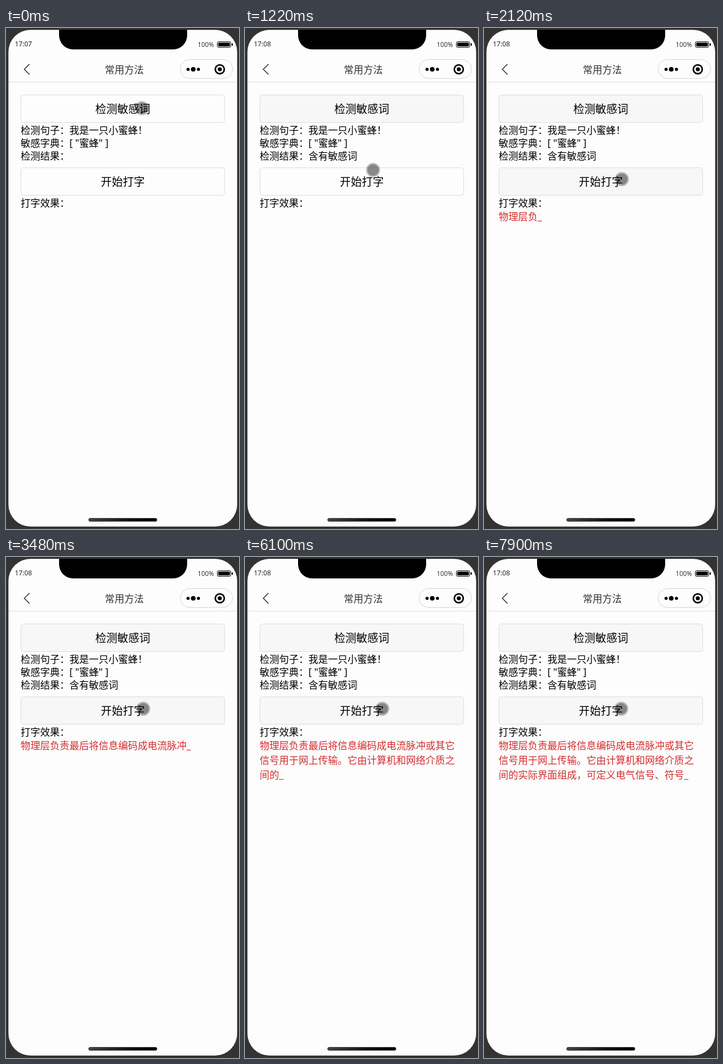
An HTML page with a canvas for the animation above (7990 ms loop, 382 by 819 pixels).

```html
<!DOCTYPE html>
<html lang="zh-CN">
<head>
<meta charset="utf-8">
<title>常用方法</title>
<style>
html, body { margin: 0; width: 100%; height: 100%; overflow: hidden; background: #333; }
canvas { display: block; width: 382px; height: 819px; }
</style>
</head>
<body>
<canvas id="stage"></canvas>
<script>
const W = 382, H = 819, LOOP = 7990;
const FONT = '"Noto Sans", "Noto Sans CJK SC", "Noto Sans CJK", sans-serif';
const PAGE = '#fdfdfd';
// full-width punctuation
const COLON = '\uff1a', COMMA = '\uff0c', BANG = '\uff01';
const TYPED = '物理层负责最后将信息编码成电流脉冲或其它信号用于网上传输。' +
  '它由计算机和网络介质之间的实际界面组成' + COMMA + '可定义电气信号、符号';
const PER_LINE = 20, TYPE_START = 1790, TYPE_STEP = 105;
const DETECT_AT = 590, RESULT_AT = 680, MINUTE_AT = 800, TYPE_CLICK = 1690;

// pointer path: time, x, y
const PATH = [
  [0, 223, 131], [760, 223, 131], [1220, 210, 232], [1310, 210, 238],
  [1400, 212, 240], [1600, 226, 247], [3060, 226, 247], [3120, 225, 248]
];

const canvas = document.getElementById('stage');
const ctx = canvas.getContext('2d');
const dpr = window.devicePixelRatio || 1;
canvas.width = W * dpr;
canvas.height = H * dpr;

function text(str, x, y, size, color = '#000', align = 'left') {
  ctx.font = size + 'px ' + FONT;
  ctx.textAlign = align;
  ctx.fillStyle = color;
  ctx.fillText(str, x, y);
}

function box(x, y, w, h, r, fill, stroke, line = 1) {
  ctx.beginPath();
  ctx.roundRect(x, y, w, h, r);
  if (fill) { ctx.fillStyle = fill; ctx.fill(); }
  if (stroke) { ctx.strokeStyle = stroke; ctx.lineWidth = line; ctx.stroke(); }
}

function disc(x, y, r, color) {
  ctx.beginPath();
  ctx.arc(x, y, r, 0, 7);
  ctx.fillStyle = color;
  ctx.fill();
}

function button(label, y, pressed) {
  box(24.5, y + 0.5, 334, 45, 4, pressed ? '#f7f7f7' : PAGE, '#dedede');
  text(label, 191.5, y + 30, 18, '#000', 'center');
}

function drawPhone(t) {
  ctx.fillStyle = '#333';
  ctx.fillRect(0, 0, W, H);
  box(4, 3, 375, 812, 36, PAGE);
  box(87, 3, 210, 32, [0, 0, 23, 23], '#000');

  text(t < MINUTE_AT ? '17:07' : '17:08', 14.5, 30, 11, '#222');
  text('100%', 341, 31, 10.5, '#333', 'right');
  box(346.5, 22.5, 22, 9, 2, null, '#000');
  box(348, 24, 19, 6, 1, '#000');
  box(370, 25, 2, 4, 1, '#000');

  const bar = ctx.createLinearGradient(135, 0, 248, 0);
  bar.addColorStop(0, '#444');
  bar.addColorStop(0.6, '#111');
  bar.addColorStop(1, '#000');
  box(135.5, 801.5, 112, 5, 2.5, bar, '#444');
}

function drawHeader() {
  ctx.beginPath();
  ctx.moveTo(38.5, 59);
  ctx.lineTo(30, 67.5);
  ctx.lineTo(38.5, 76);
  ctx.strokeStyle = '#333';
  ctx.lineWidth = 1.4;
  ctx.stroke();
  text('常用方法', 194, 74, 16, '#333', 'center');

  box(285.5, 51.5, 86, 31, 15.5, null, '#d8d8d8');
  disc(298.5, 67.5, 2.6, '#000');
  disc(307, 67.5, 3.8, '#000');
  disc(315.5, 67.5, 2.6, '#000');
  disc(350.5, 67.5, 8.6, '#000');
  disc(350.5, 67.5, 6.1, PAGE);
  disc(350.5, 67.5, 3.3, '#000');

  ctx.fillStyle = '#dedede';
  ctx.fillRect(4, 88, 375, 1);
}

function drawTyping(t) {
  if (t < TYPE_START) return;
  const count = Math.min(TYPED.length, 1 + Math.floor((t - TYPE_START) / TYPE_STEP));
  for (let i = 0, row = 0; i < count; i += PER_LINE, row++) {
    const end = Math.min(i + PER_LINE, count);
    const caret = end === count ? '_' : '';
    text(TYPED.slice(i, end) + caret, 24, 314 + row * 24, 16, '#d22c30');
  }
}

function drawPointer(t) {
  let i = PATH.length - 1;
  while (PATH[i][0] > t) i--;
  const a = PATH[i], b = PATH[i + 1] || a;
  const k = b === a ? 0 : (t - a[0]) / (b[0] - a[0]);
  const x = a[1] + (b[1] - a[1]) * k, y = a[2] + (b[2] - a[2]) * k;
  disc(x, y, 11.5, 'rgba(0,0,0,.25)');
  disc(x, y, 9.3, 'rgba(0,0,0,.28)');
}

function draw(t) {
  ctx.setTransform(dpr, 0, 0, dpr, 0, 0);
  drawPhone(t);
  drawHeader();
  button('检测敏感词', 109, t >= DETECT_AT);
  text('检测句子' + COLON + '我是一只小蜜蜂' + BANG, 24, 173, 16);
  text('敏感字典' + COLON + '[ "蜜蜂" ]', 24, 194, 16);
  text('检测结果' + COLON + (t >= RESULT_AT ? '含有敏感词' : ''), 24, 215, 16);
  button('开始打字', 228, t >= TYPE_CLICK);
  text('打字效果' + COLON, 24, 292, 16);
  drawTyping(t);
  drawPointer(t);
}

const start = performance.now();
function frame() {
  draw((performance.now() - start) % LOOP);
  requestAnimationFrame(frame);
}
frame();
</script>
</body>
</html>
```
